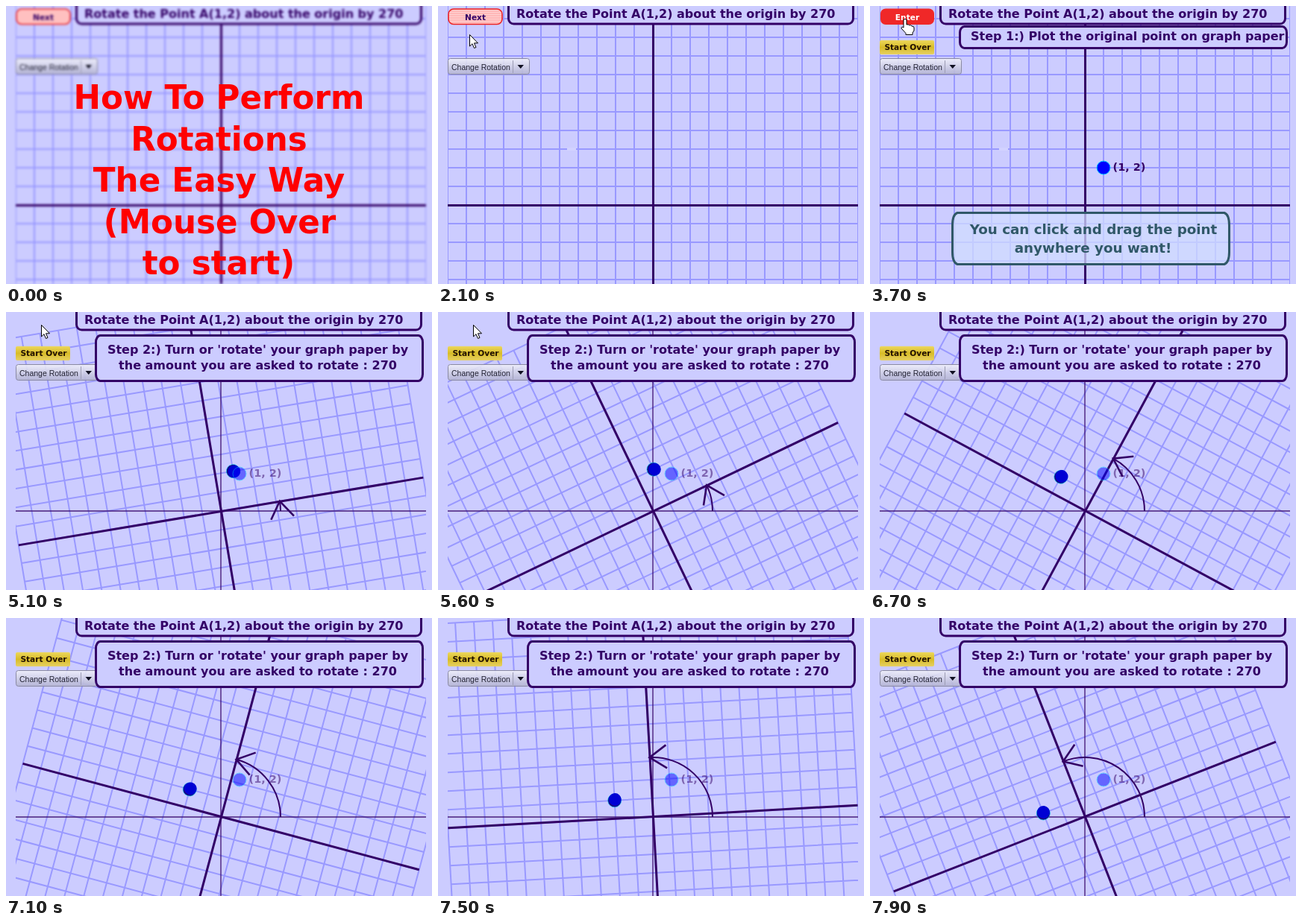
Recreate the animation shown at these times as an HTML page. Size 571x373 px, loop 8 s.

```html
<!DOCTYPE html>
<html lang="en">
<head>
<meta charset="utf-8">
<title>Rotations</title>
<style>
  html, body { margin: 0; width: 100%; height: 100%; overflow: hidden; background: #ccf; }
  svg { display: block; }
  text { font: bold 16px Verdana, "DejaVu Sans", sans-serif; fill: #306; }
  .mid { text-anchor: middle; }
  .small text { font-size: 10.6px; text-anchor: middle; }
  .box { fill: #ccf; stroke: #306; stroke-width: 3; }
  .ink { fill: none; stroke: #306; }
  #note text { font-size: 18.3px; fill: #305868; }
  #title text { font-size: 43.6px; fill: #f00; }
  #combo text { font: 10.5px Arial, "Liberation Sans", sans-serif; fill: #223; }
</style>
</head>
<body>
<svg width="571" height="373" viewBox="0 0 571 373">
  <defs>
    <clipPath id="frame"><path d="M13 0H563V373H13Z"/></clipPath>
    <linearGradient id="grey" x2="0" y2="1"><stop stop-color="#f0f0fa"/><stop offset="1" stop-color="#b2b2d2"/></linearGradient>
    <linearGradient id="gold" x2="0" y2="1"><stop stop-color="#ecd75c"/><stop offset=".5" stop-color="#d8bc28"/><stop offset="1" stop-color="#e6d062"/></linearGradient>
    <pattern id="stripes" width="4" height="3" patternUnits="userSpaceOnUse"><path d="M0 0H4V3H0Z" fill="#ffd0d0"/><path d="M0 1H4" stroke="#ffb0b0" stroke-width="1.5"/></pattern>
  </defs>
  <g id="scene">
    <g clip-path="url(#frame)">
      <g id="paper">
        <path id="grid" fill="none" stroke="#99f" stroke-width="2"/>
        <path class="ink" stroke-width="3" d="M13 267.5H563M288.5 -8V542"/>
      </g>
      <path id="smudge" d="M173 190H185V194H173Z" fill="#d2d2ff"/>
      <path id="axes" class="ink" stroke-width="1.4" opacity=".85" d="M13 267H563M288 0V373"/>
    </g>
    <g id="turned">
      <circle id="shadow" cx="313" cy="217" r="9" fill="#1c0078" stroke="#0cf" stroke-width=".6"/>
      <circle id="dot" cx="313" cy="217" r="8.4" fill="#0000d4"/>
    </g>
    <g id="point">
      <circle cx="313" cy="217" r="9" fill="#00f" stroke="#0cf"/>
      <text x="325.5" y="221" style="font-size:14.5px">(1, 2)</text>
    </g>
    <path id="arc" class="ink" stroke-width="2"/>
    <path id="head" class="ink" stroke-width="2.6"/>
    <g id="note">
      <path d="M117 277.5H475Q481.500 280 481.500 294V330Q481.500 344 475 346.500H117Q110.500 344 110.500 330V294Q110.500 280 117 277.500Z" fill="#d0dcff" fill-opacity=".75" stroke="#305868" stroke-width="3"/>
      <text class="mid" x="299.500" y="306">You can click and drag the point</text>
      <text class="mid" x="299" y="331">anywhere you want!</text>
    </g>
    <g id="combo">
      <rect x="13.500" y="70.500" width="109" height="21" rx="3" fill="url(#grey)" fill-opacity=".9" stroke="#8a8aa2"/>
      <path d="M100.500 73V90" stroke="#9c9cb4"/>
      <path d="M106.500 79H115L110.750 84Z" fill="#112"/>
      <text x="18" y="86">Change Rotation</text>
    </g>
    <g id="next" class="small">
      <rect x="14" y="4" width="72" height="20.500" rx="7" fill="url(#stripes)" stroke="#e22" stroke-width="1.600"/>
      <text x="50" y="19">Next</text>
    </g>
    <g id="enter" class="small">
      <rect x="14" y="3.500" width="72" height="21.500" rx="7" fill="#f02828"/>
      <text id="enterLabel" x="50" y="19" style="fill:#fff">Enter</text>
    </g>
    <g id="over" class="small">
      <rect x="13" y="46" width="73" height="19" rx="2" fill="url(#gold)"/>
      <text x="50.500" y="58.500" style="fill:#210">Start Over</text>
    </g>
    <rect class="box" x="94.500" y="-20" width="462" height="44" rx="7"/>
    <text x="105" y="16">Rotate the Point A(1,2) about the origin by 270</text>
    <g id="step1">
      <rect class="box" x="120.500" y="27.500" width="438" height="29" rx="6" ry="8"/>
      <text x="135" y="46">Step 1:) Plot the original point on graph paper</text>
    </g>
    <g id="step2">
      <rect class="box" x="120.500" y="31.500" width="438" height="61" rx="6" ry="9"/>
      <text class="mid" x="337.500" y="56">Step 2:) Turn or 'rotate' your graph paper by</text>
      <text class="mid" x="337.500" y="77">the amount you are asked to rotate : 270</text>
    </g>
  </g>
  <g id="cursor" fill="#fff" stroke="#000">
    <path id="arrow" d="M.5 .5V16L4 12.700L6.500 18.500L9 17.500L6.500 11.800H11.500Z"/>
    <path id="hand" d="M-2 2Q-2 .5 0 .5Q2 .5 2 2V8Q5 7 5.500 9Q8 8 9 10Q12 10 12 12V16L10 19V21.500H1V19.500L-5 13Q-5 10 -2 12Z"/>
  </g>
  <g id="title" class="mid">
    <text x="285.500" y="138">How To Perform</text>
    <text x="285.500" y="194">Rotations</text>
    <text x="285.500" y="249">The Easy Way</text>
    <text x="286.500" y="305">(Mouse Over</text>
    <text x="285" y="360">to start)</text>
  </g>
</svg>
<script>
const LOOP = 8000, STEP = 100, CX = 288, CY = 267, RADIUS = 80;
const $ = id => document.getElementById(id);
const set = (id, name, value) => $(id).setAttribute(name, value);
const fade = (id, value) => set(id, 'opacity', +value);
const ramp = (t, a, b) => Math.min(1, Math.max(0, (t - a) / (b - a)));
const spin = (id, deg) => set(id, 'transform', `rotate(${-deg} ${CX} ${CY})`);

// Linear interpolation through [time, value] keys
function track(t, keys) {
  let value = keys[0][1];
  for (let i = 1; i < keys.length; i++)
    value += (keys[i][1] - keys[i - 1][1]) * ramp(t, keys[i - 1][0], keys[i][0]);
  return value;
}

const ANGLE = [[4800, 0], [5100, 9.5], [6200, 45], [7100, 75], [7900, 111.4]];
const CURSOR_X = [[1500, 316], [2100, 42], [2400, 47]];
const CURSOR_Y = [[1500, 249], [2100, 38], [2400, 17]];

let lines = '';
for (let d = -275; d <= 275; d += 25)
  lines += `M${CX + d} ${CY - 275}v550M${CX - 275} ${CY + d}h550`;
set('grid', 'd', lines);

function drawArrow(deg) {
  const a = deg * Math.PI / 180;
  const x = CX + RADIUS * Math.cos(a), y = CY - RADIUS * Math.sin(a);
  const leg = side => {
    const dir = Math.PI / 2 - a + side * 0.6;
    return `${x + 27.5 * Math.cos(dir)} ${y + 27.5 * Math.sin(dir)}`;
  };
  set('arc', 'd', `M${CX + RADIUS} ${CY}A${RADIUS} ${RADIUS} 0 0 0 ${x} ${y}`);
  set('head', 'd', `M${leg(-1)}L${x} ${y}L${leg(1)}`);
}

function draw(t) {
  const intro = t < 1300, turning = t >= 4900;
  const shown = ramp(t, 2400, 2700), swapped = ramp(t, 3700, 4000);
  const angle = track(t, ANGLE);

  $('scene').style.filter = intro ? 'blur(1.4px)' : 'none';
  fade('title', intro);
  spin('paper', angle);
  spin('shadow', angle);
  spin('dot', angle - 1.5);
  drawArrow(angle);
  for (const id of ['turned', 'arc', 'head']) fade(id, turning);
  fade('axes', turning ? 0.85 : 0);
  fade('smudge', !intro && !turning);

  fade('point', turning ? 0.5 : shown);
  fade('over', shown);
  fade('step1', shown * (1 - swapped));
  fade('step2', swapped);
  fade('note', shown - 0.5 * swapped - 0.5 * ramp(t, 4500, 4700));

  fade('next', t < 2200);
  fade('enter', t < 2200 ? 0 : 1 - swapped);
  $('enterLabel').textContent = t < 2400 ? 'Next' : 'Enter';

  const pointing = t >= 2200 && t < 4000;
  set('cursor', 'transform', `translate(${track(t, CURSOR_X)} ${track(t, CURSOR_Y)})`);
  fade('cursor', !intro && t < 5800);
  fade('hand', pointing);
  fade('arrow', !pointing);
}

const start = performance.now();
function tick() {
  const t = (performance.now() - start) % LOOP;
  draw(Math.floor(t / STEP) * STEP);
  requestAnimationFrame(tick);
}
tick();
</script>
</body>
</html>
```
